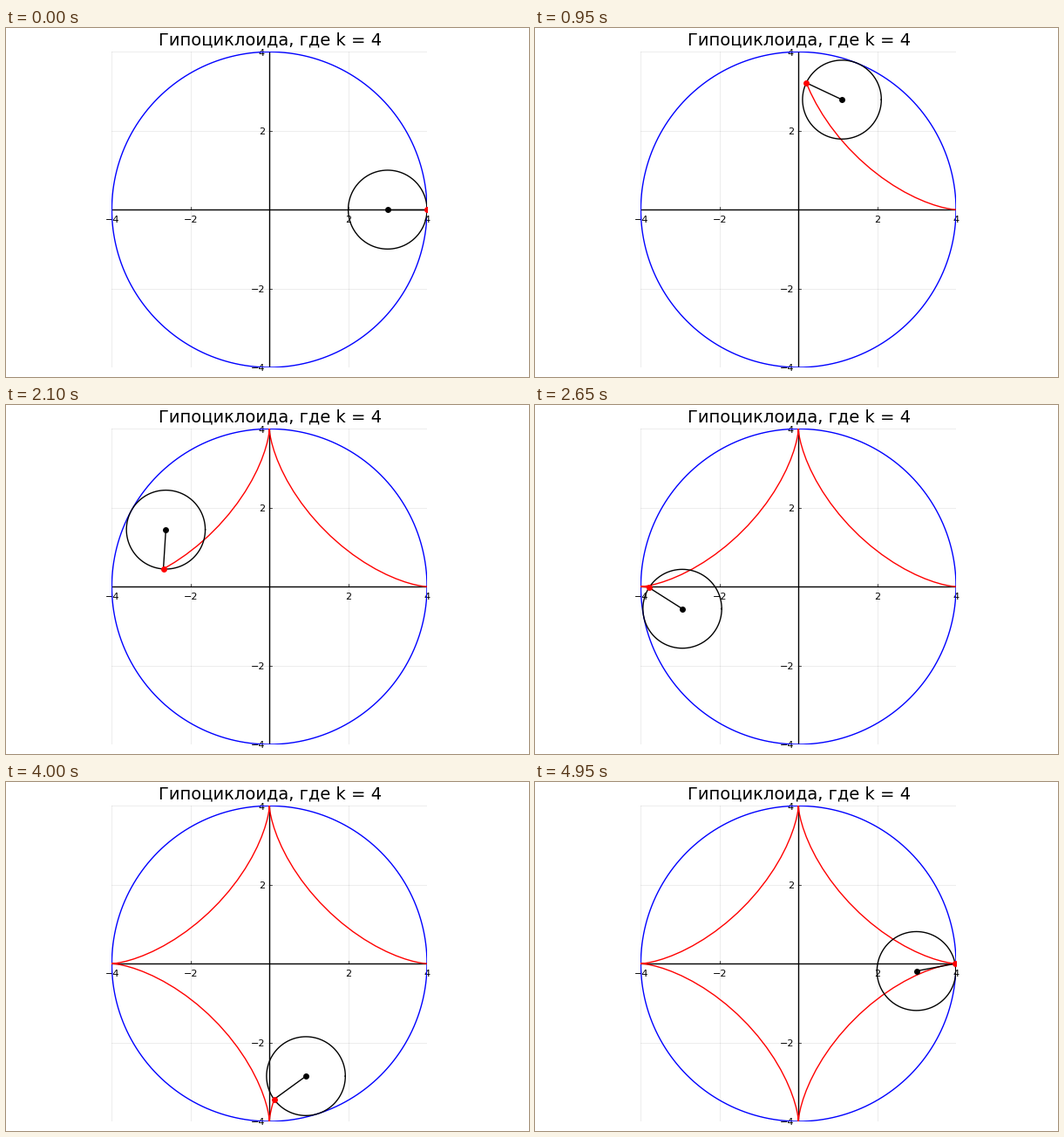
A matplotlib script that plays this animation: 600 by 400 pixels, repeating every 5000 ms.

```python
import numpy as np
import matplotlib.pyplot as plt
from matplotlib.animation import FuncAnimation

plt.rcParams["font.family"] = "DejaVu Sans"

W, H, DPI = 600, 400, 100
CX, CY, UNIT = 302.2, 208.15, 45.2   # origin and scale in pixels
PAD = 0.4                            # clip margin around the plot in pixels
K, R_SMALL = 4, 1.0
R_BIG = K * R_SMALL
R_PATH = R_BIG - R_SMALL
FRAMES, INTERVAL = 100, 50
LINE, THIN = 1.0, 0.5

fig = plt.figure(figsize=(W / DPI, H / DPI), dpi=DPI, facecolor="white")
half = R_BIG * UNIT + PAD
ax = fig.add_axes([(CX - half) / W, 1 - (CY + half) / H,
                   2 * half / W, 2 * half / H])
ax.set_xlim(-half / UNIT, half / UNIT)
ax.set_ylim(-half / UNIT, half / UNIT)
ax.axis("off")


def label(x, y, text, size, ha):
    """Text with its baseline at pixel (x, y), measured from the top left."""
    fig.text(x / W, 1 - y / H, text, fontsize=size, ha=ha,
             va="baseline", color="black", zorder=-1)


def line(color, xs=(), ys=(), lw=LINE, **style):
    return ax.plot(xs, ys, color=color, lw=lw, **style)[0]


def dot(color):
    return ax.plot([], [], "o", color=color, ms=5, mew=0)[0]


def draw_axes():
    tick = 3 / UNIT
    span = [-R_BIG, R_BIG]
    for v in (-4, -2, 2, 4):
        line("black", [v, v], span, THIN, alpha=0.1)
        line("black", span, [v, v], THIN, alpha=0.1)
        line("black", [v, v], [0, tick], THIN)
        line("black", [0, tick], [v, v], THIN)
        text = str(v).replace("-", "\u2212")
        label(CX + 0.3 + v * UNIT, 223, text, 8, "center")
        label(297, CY - v * UNIT + 4.5, text, 8, "right")
    line("black", span, [0, 0])
    line("black", [0, 0], span)


label(303, 19, f"Гипоциклоида, где k = {K}", 14, "center")
draw_axes()

turn = np.linspace(0, 2 * np.pi, 201)
ring_x, ring_y = np.cos(turn), np.sin(turn)
line("blue", R_BIG * ring_x, R_BIG * ring_y)

trace = line("red")
wheel = line("black")
spoke = line("black")
hub = dot("black")
pen = dot("red")


def hypocycloid(t):
    x = R_PATH * np.cos(t) + R_SMALL * np.cos((K - 1) * t)
    y = R_PATH * np.sin(t) - R_SMALL * np.sin((K - 1) * t)
    return x, y


def update(i):
    angles = 2 * np.pi * np.arange(i + 1) / FRAMES
    xs, ys = hypocycloid(angles)
    hx, hy = R_PATH * np.cos(angles[-1]), R_PATH * np.sin(angles[-1])
    trace.set_data(xs, ys)
    wheel.set_data(hx + R_SMALL * ring_x, hy + R_SMALL * ring_y)
    spoke.set_data([hx, xs[-1]], [hy, ys[-1]])
    hub.set_data([hx], [hy])
    pen.set_data([xs[-1]], [ys[-1]])
    return trace, wheel, spoke, hub, pen


anim = FuncAnimation(fig, update, frames=FRAMES, interval=INTERVAL,
                     repeat=True, repeat_delay=0)
plt.show()
```
